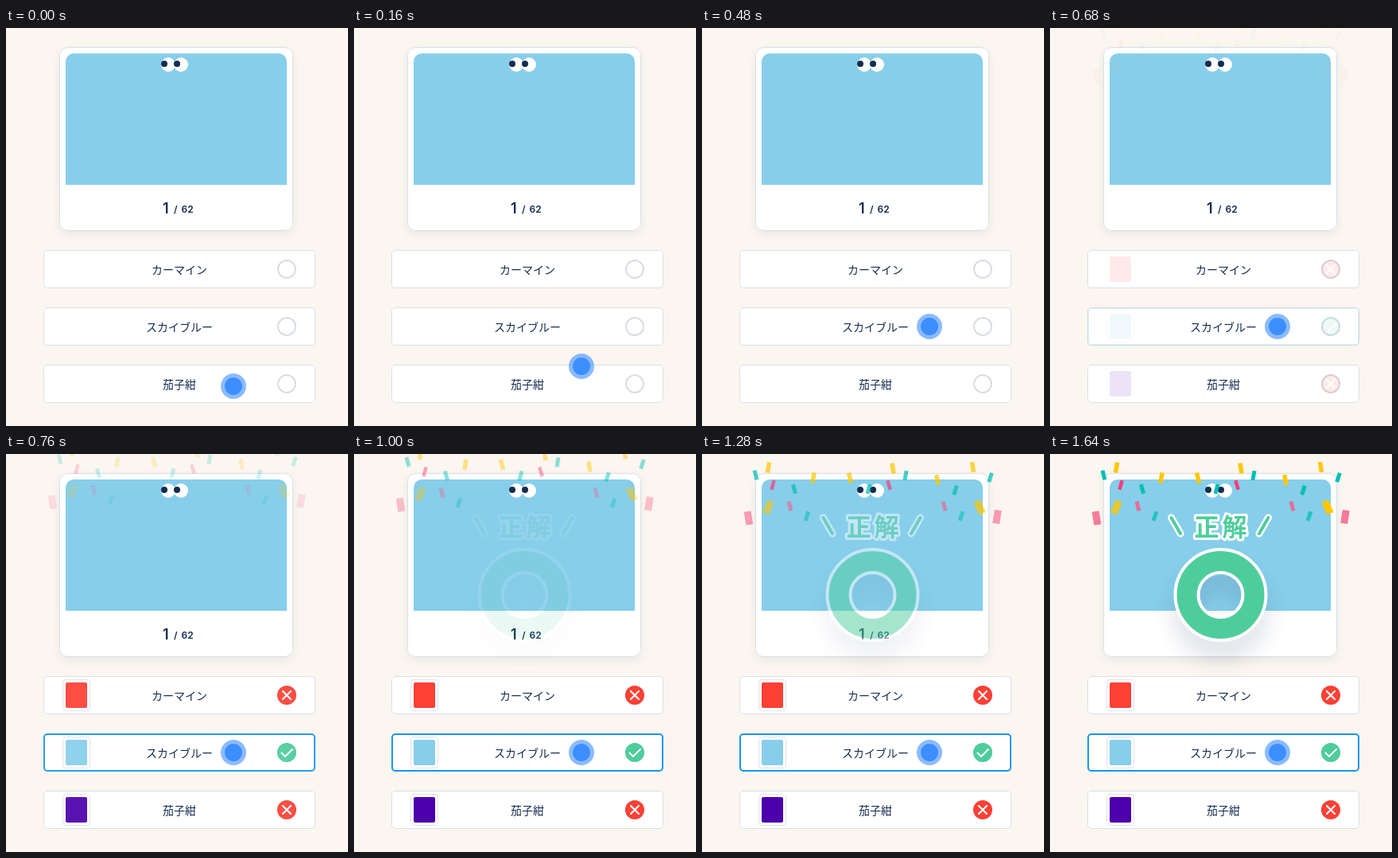
Animation of 430 by 500 pixels, one loop 1.96 s. Source, as an HTML page with a canvas:

```html
<!DOCTYPE html>
<html lang="ja">
<head>
<meta charset="utf-8">
<title>Color quiz</title>
<style>
  html, body { margin: 0; width: 100%; height: 100%; overflow: hidden; background: #fbf6f0; }
  canvas { display: block; }
</style>
</head>
<body>
<canvas id="stage" width="430" height="500"></canvas>
<script>
const WIDTH = 430, HEIGHT = 500, LOOP = 1960, STEP = 40;
const INK = '#142c50', SKY = '#87ceeb', GREEN = '#4ecd9c', RED = '#ff4034';
const CJK = '"Noto Sans CJK JP", "Noto Sans CJK", sans-serif';

const options = [
  { label: 'カーマイン', color: RED, y: 279 },
  { label: 'スカイブルー', color: SKY, y: 351, correct: true },
  { label: '茄子紺', color: '#4b00ac', y: 423 }
];

// Each piece: centre x, centre y, tilt in degrees.
const confetti = [
  { color: '#f87a9b', w: 9, h: 17, pieces: [[58.5, 80.5, -9], [371, 79, 9]] },
  { color: '#00bfb3', w: 5, h: 12, pieces: [[67.5, 26.5, -14], [116, 44, -16], [209.5, 44, 15],
    [256, 27, 10], [318.5, 45.5, 18], [362.5, 29.5, 18]] },
  { color: '#fec700', w: 5.5, h: 13, pieces: [[83.5, 17, 10], [140, 30, 10], [186, 30, -14],
    [240, 18, -10], [296, 32.5, -11], [340.5, 16.5, -9]] },
  { color: '#f73c7c', w: 4.5, h: 12, pieces: [[89, 39, 16], [235, 39, -17]] },
  { color: '#f9578a', w: 5, h: 12, alpha: 0.8, pieces: [[110.5, 65.5, -13], [304.5, 65.5, -15]] },
  { color: '#00bfb3', w: 5, h: 12, alpha: 0.75, pieces: [[132, 78, 18], [326, 78, 18]] },
  { color: '#fec700', w: 9, h: 17, alpha: 0.8, pieces: [[83.5, 67, 22]] },
  { color: '#fec700', w: 9, h: 17, pieces: [[349, 67, -24]] }
];

// Keyframes as [time, value], linear in between.
const cursorY = [[0, 450], [480, 375]];
const revealAlpha = [[640, 0], [680, 0.1], [720, 0.55], [760, 0.92], [840, 1]];
const confettiAlpha = [[640, 0], [680, 0.03], [760, 0.2], [1000, 0.46], [1280, 0.73], [1640, 1]];
const confettiShift = [[960, -20], [1200, 0]];
const correctAlpha = [[920, 0], [1640, 1]];

function track(keys, t) {
  if (t <= keys[0][0]) return keys[0][1];
  for (let i = 1; i < keys.length; i++) {
    const [t0, v0] = keys[i - 1], [t1, v1] = keys[i];
    if (t < t1) return v0 + (v1 - v0) * (t - t0) / (t1 - t0);
  }
  return keys[keys.length - 1][1];
}

function box(c, x, y, w, h, r, fill) {
  c.beginPath();
  c.roundRect(x, y, w, h, r);
  c.fillStyle = fill;
  c.fill();
}

function frame(c, x, y, w, h, r, color, line = 1) {
  c.beginPath();
  c.roundRect(x + line / 2, y + line / 2, w - line, h - line, r);
  c.lineWidth = line;
  c.strokeStyle = color;
  c.stroke();
}

function disc(c, x, y, r, fill) {
  c.beginPath();
  c.arc(x, y, r, 0, Math.PI * 2);
  c.fillStyle = fill;
  c.fill();
}

function circle(c, x, y, r, color, line) {
  c.beginPath();
  c.arc(x, y, r, 0, Math.PI * 2);
  c.lineWidth = line;
  c.strokeStyle = color;
  c.stroke();
}

function path(c, points, color, line) {
  c.beginPath();
  points.forEach(([x, y]) => c.lineTo(x, y));
  c.lineWidth = line;
  c.strokeStyle = color;
  c.stroke();
}

function text(c, string, x, y, font, align = 'left') {
  c.font = font;
  c.textAlign = align;
  c.fillStyle = INK;
  c.fillText(string, x, y);
}

function shadow(c, color, blur, dy) {
  c.shadowColor = color;
  c.shadowBlur = blur;
  c.shadowOffsetY = dy;
}

function layer(draw) {
  const canvas = document.createElement('canvas');
  canvas.width = WIDTH;
  canvas.height = HEIGHT;
  const c = canvas.getContext('2d');
  c.lineCap = c.lineJoin = 'round';
  draw(c);
  return canvas;
}

const base = layer(c => {
  c.fillStyle = '#fbf6f0';
  c.fillRect(0, 0, WIDTH, HEIGHT);
  c.save();
  shadow(c, 'rgba(40, 50, 80, 0.08)', 12, 4);
  box(c, 67, 24, 294, 231, 10, '#fff');
  c.restore();
  frame(c, 67, 24, 294, 231, 10, '#d9dfe8');
  box(c, 75, 32, 278, 165, [10, 10, 0, 0], SKY);
  for (const x of [204, 220]) disc(c, x, 46, 9, '#fff');
  for (const x of [199, 215]) disc(c, x, 45, 4, INK);
  text(c, '1', 197, 233, '600 18px Inter, sans-serif');
  text(c, '/', 211, 231.5, '600 12px Inter, sans-serif');
  text(c, '62', 220.5, 231.5, '600 12px Inter, sans-serif');
  for (const { label, y } of options) {
    box(c, 47, y, 342, 48, 4, '#fff');
    frame(c, 47, y, 342, 48, 4, '#d9dfe8');
    circle(c, 353, y + 24, 11, '#d9dde6', 2);
    text(c, label, 218, y + 30, '500 14px ' + CJK, 'center');
  }
});

const reveal = layer(c => {
  for (const { color, y, correct } of options) {
    box(c, 71, y + 4, 35, 40, 3, '#fff');
    frame(c, 71, y + 4, 35, 40, 3, '#dfe3ea');
    box(c, 75, y + 8, 27, 32, 2, color);
    disc(c, 353, y + 24, 12, correct ? GREEN : RED);
    if (correct) {
      frame(c, 47, y, 342, 48, 4, '#1b95f0', 2);
      path(c, [[346.5, y + 24.5], [351, y + 29], [360, y + 20]], '#fff', 2);
    } else {
      path(c, [[348, y + 19], [358, y + 29]], '#fff', 2.2);
      path(c, [[358, y + 19], [348, y + 29]], '#fff', 2.2);
    }
  }
});

const correct = layer(c => {
  c.save();
  shadow(c, 'rgba(30, 50, 90, 0.14)', 28, 22);
  circle(c, 214.5, 177, 42.5, '#fff', 33);
  c.restore();
  circle(c, 214.5, 177, 42.5, GREEN, 25);
  for (const [color, line] of [['#fff', 9], [GREEN, 4]]) {
    path(c, [[152.5, 80], [164, 100]], color, line);
    path(c, [[274.5, 80], [263, 100]], color, line);
  }
  c.font = 'bold 31px ' + CJK;
  c.textAlign = 'center';
  c.lineWidth = 6;
  c.strokeStyle = '#fff';
  c.fillStyle = GREEN;
  for (const [glyph, x] of [['正', 197], ['解', 232]]) {
    c.strokeText(glyph, x, 103);
    c.fillText(glyph, x, 103);
  }
});

const confettiLayer = layer(c => {
  for (const { color, w, h, alpha = 1, pieces } of confetti) {
    c.fillStyle = color;
    c.globalAlpha = alpha;
    for (const [x, y, tilt] of pieces) {
      c.save();
      c.translate(x, y);
      c.rotate(tilt * Math.PI / 180);
      c.fillRect(-w / 2, -h / 2, w, h);
      c.restore();
    }
  }
});

const ctx = document.getElementById('stage').getContext('2d');

function show(image, alpha, dy = 0) {
  ctx.globalAlpha = alpha;
  ctx.drawImage(image, 0, dy);
  ctx.globalAlpha = 1;
}

function render(t) {
  show(base, 1);
  show(reveal, track(revealAlpha, t));
  show(confettiLayer, track(confettiAlpha, t), track(confettiShift, t));
  show(correct, track(correctAlpha, t));
  const y = track(cursorY, t);
  disc(ctx, 286, y, 16, 'rgba(61, 142, 254, 0.6)');
  disc(ctx, 286, y, 11, '#3d8efe');
}

const start = performance.now();
function tick() {
  const elapsed = (performance.now() - start) % LOOP;
  render(Math.floor(elapsed / STEP) * STEP);
  requestAnimationFrame(tick);
}
tick();
</script>
</body>
</html>
```
